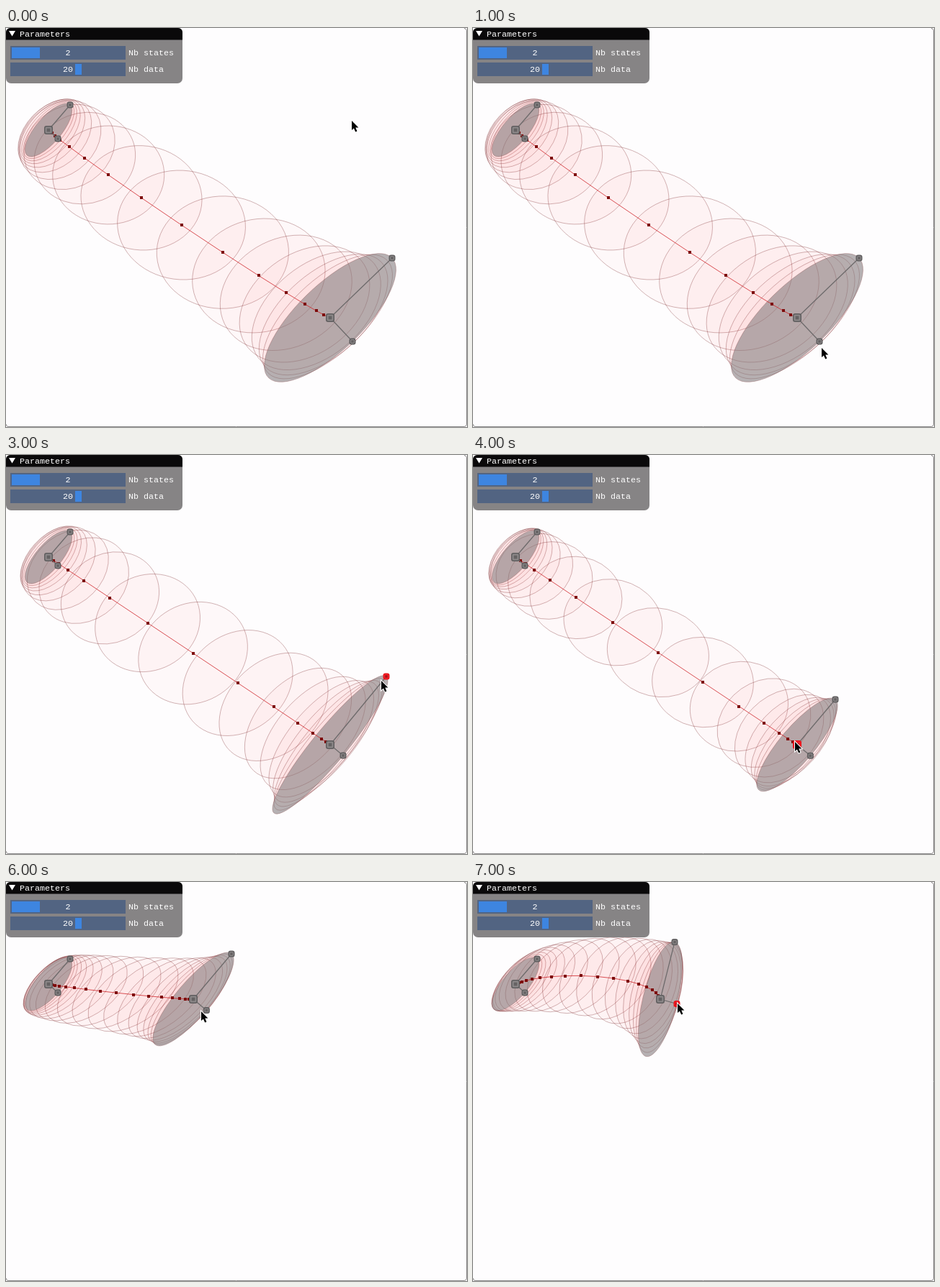
These frames come from a looping animation (640x555 px, 8000 ms). An HTML page with a canvas:

```html
<!DOCTYPE html>
<html lang="en">
<head>
<meta charset="utf-8">
<title>Gaussian interpolation</title>
<style>
  html, body { margin: 0; width: 100%; height: 100%; overflow: hidden; background: #fefdfe; }
  canvas { display: block; }
</style>
</head>
<body>
<canvas id="stage" width="640" height="555"></canvas>
<script>
const ctx = document.getElementById('stage').getContext('2d');
const STEP_MS = 1000;
const NB_DATA = 20;

// A Gaussian is a centre plus the vectors to its long and short axis handles.
// While a centre is dragged quickly, the tube trails its handles by `lag`.
const first = { center: [59, 142], long: [30, -35], short: [13, 12] };
const poses = [
  { center: [450, 403], long: [86, -83], short: [31, 33], cursor: [480, 129] },
  { center: [450, 403], long: [86, -83], short: [31, 33], cursor: [484, 445] },
  { center: [450, 403], long: [75, -94], short: [19, 15], cursor: [470, 419], active: 'short' },
  { center: [450, 403], long: [78, -95], short: [18, 15], cursor: [521, 314], active: 'long' },
  { center: [450, 403], long: [53, -63], short: [18.4, 15.3], cursor: [447, 399], active: 'center' },
  { center: [293.5, 165.5], long: [53, -63], short: [18.4, 15.3], lag: [5.2, 0.5], cursor: [283, 165], active: 'center' },
  { center: [260, 163], long: [53, -63], short: [18.4, 15.5], cursor: [271, 180] },
  { center: [260, 163], long: [20, -79.5], short: [23, 6.5], cursor: [284, 169], active: 'short' }
];

// Jacobi eigendecomposition of a symmetric 3x3 matrix; vectors are columns.
function eigen(matrix) {
  const a = matrix.map(row => row.slice());
  const v = [[1, 0, 0], [0, 1, 0], [0, 0, 1]];
  for (let sweep = 0; sweep < 12; sweep++) {
    for (const [p, q] of [[0, 1], [0, 2], [1, 2]]) {
      if (Math.abs(a[p][q]) < 1e-12) continue;
      const angle = 0.5 * Math.atan2(2 * a[p][q], a[q][q] - a[p][p]);
      const c = Math.cos(angle), s = Math.sin(angle);
      const rotateColumns = m => m.forEach(row => {
        [row[p], row[q]] = [c * row[p] - s * row[q], s * row[p] + c * row[q]];
      });
      rotateColumns(a);
      for (let k = 0; k < 3; k++) {
        [a[p][k], a[q][k]] = [c * a[p][k] - s * a[q][k], s * a[p][k] + c * a[q][k]];
      }
      rotateColumns(v);
    }
  }
  return { values: [0, 1, 2].map(i => Math.max(a[i][i], 1e-9)), vectors: v };
}

// Geodesic between two Gaussians embedded as augmented SPD matrices.
function interpolate(from, to) {
  const [ax, ay] = from.long, [bx, by] = from.short;
  const [lagX, lagY] = to.lag || [0, 0];
  const det = ax * by - ay * bx;
  const toLocal = ([x, y]) => [(by * x - bx * y) / det, (ax * y - ay * x) / det];
  const toStage = ([x, y]) => [ax * x + bx * y, ay * x + by * y];
  const offset = [to.center[0] + lagX - from.center[0], to.center[1] + lagY - from.center[1]];
  const columns = [[...toLocal(to.long), 0], [...toLocal(to.short), 0], [...toLocal(offset), 1]];
  const augmented = [0, 1, 2].map(i => [0, 1, 2].map(j =>
    columns.reduce((sum, col) => sum + col[i] * col[j], 0)));
  const { values, vectors } = eigen(augmented);

  return Array.from({ length: NB_DATA }, (_, n) => {
    const t = n / (NB_DATA - 1);
    const powers = values.map(value => value ** t);
    const entry = (i, j) => powers.reduce((sum, w, k) => sum + w * vectors[i][k] * vectors[j][k], 0);
    const beta = entry(2, 2);
    const mu = [entry(0, 2) / beta, entry(1, 2) / beta];
    const cov = (i, j) => entry(i, j) - beta * mu[i] * mu[j];
    const l11 = Math.sqrt(Math.max(cov(0, 0), 1e-9));
    const l21 = cov(0, 1) / l11;
    const l22 = Math.sqrt(Math.max(cov(1, 1) - l21 * l21, 1e-9));
    const shift = toStage(mu);
    return {
      center: [from.center[0] + shift[0], from.center[1] + shift[1]],
      long: toStage([l11, l21]),
      short: toStage([0, l22])
    };
  });
}

function ellipsePath({ center, long, short }) {
  ctx.save();
  ctx.transform(...long, ...short, ...center);
  ctx.beginPath();
  ctx.arc(0, 0, 1, 0, 2 * Math.PI);
  ctx.restore();
}

function box(x, y, w, h, fill, radius = 0) {
  ctx.fillStyle = fill;
  ctx.beginPath();
  ctx.roundRect(x, y, w, h, radius);
  ctx.fill();
}

function drawHandle([x, y], size, active) {
  const [ring, face, core] = active
    ? ['#e8121a', '#f8202a', '#a81418']
    : ['#5f5d5e', '#8b8788', '#656263'];
  const half = size / 2 - 0.75;
  box(x - half, y - half, 2 * half, 2 * half, face, 2.5);
  ctx.strokeStyle = ring;
  ctx.lineWidth = 1.5;
  ctx.stroke();
  const inner = size * 0.4;
  box(x - inner / 2, y - inner / 2, inner, inner, core);
}

function drawGaussian(gaussian, active) {
  const [x, y] = gaussian.center;
  const tips = ['long', 'short'].map(name => [name, [x + gaussian[name][0], y + gaussian[name][1]]]);
  ctx.strokeStyle = '#6c696a';
  ctx.lineWidth = 1.2;
  for (const [, tip] of tips) {
    ctx.beginPath();
    ctx.moveTo(x, y);
    ctx.lineTo(...tip);
    ctx.stroke();
  }
  drawHandle(gaussian.center, 12, active === 'center');
  for (const [name, tip] of tips) drawHandle(tip, 9, active === name);
}

function drawTube(chain) {
  for (const gaussian of chain) {
    ellipsePath(gaussian);
    ctx.fillStyle = 'rgba(220,45,40,.024)';
    ctx.fill();
    ctx.strokeStyle = 'rgba(115,30,32,.5)';
    ctx.lineWidth = 0.65;
    ctx.stroke();
  }
  for (const end of [chain[0], chain[NB_DATA - 1]]) {
    ellipsePath(end);
    ctx.fillStyle = 'rgba(124,120,122,.55)';
    ctx.fill();
  }
  ctx.beginPath();
  chain.forEach(({ center }) => ctx.lineTo(...center));
  ctx.strokeStyle = 'rgba(205,30,35,.85)';
  ctx.lineWidth = 0.9;
  ctx.stroke();
  for (const { center: [x, y] } of chain) {
    box(Math.round(x) - 2, Math.round(y) - 2, 4, 4, '#7d0c0c');
  }
}

function drawText(text, x, y, align = 'left') {
  ctx.font = '11.67px "Liberation Mono", monospace';
  ctx.textAlign = align;
  ctx.fillStyle = '#fff';
  ctx.fillText(text, x, y);
}

function drawSlider(y, label, value, grabX, grabWidth) {
  box(6, y, 160, 19, '#526482');
  box(grabX, y + 2, grabWidth, 15, '#3e85e0');
  drawText(value, 86, y + 13, 'center');
  drawText(label, 170, y + 13);
}

function drawPanel() {
  box(0, 0, 245, 77, '#868485', [6, 6, 7, 7]);
  box(0, 0, 245, 16.5, '#0a090a', [6, 6, 0, 0]);
  ctx.fillStyle = '#fff';
  ctx.beginPath();
  ctx.moveTo(4, 4);
  ctx.lineTo(13, 4);
  ctx.lineTo(8.5, 11.5);
  ctx.fill();
  drawText('Parameters', 19, 12);
  drawSlider(25, 'Nb states', '2', 8, 39);
  drawSlider(48, 'Nb data', '20', 96, 9);
}

function drawCursor([x, y]) {
  const outline = [[0, 0], [0, 13], [2.9, 10.4], [5.2, 15.4], [7.4, 14.4], [5.3, 9.5], [9.4, 9.5]];
  ctx.beginPath();
  outline.forEach(([dx, dy]) => ctx.lineTo(x + dx, y + dy));
  ctx.closePath();
  ctx.strokeStyle = '#fff';
  ctx.lineWidth = 2;
  ctx.stroke();
  ctx.fillStyle = '#000';
  ctx.fill();
}

function drawWindowEdge() {
  ctx.strokeStyle = '#8a8889';
  ctx.lineWidth = 1;
  ctx.beginPath();
  ctx.moveTo(636, 0.5);
  ctx.quadraticCurveTo(639.5, 0.5, 639.5, 4);
  ctx.lineTo(639.5, 551);
  ctx.quadraticCurveTo(639.5, 554.5, 636, 554.5);
  ctx.lineTo(3, 554.5);
  ctx.quadraticCurveTo(0.5, 554.5, 0, 551);
  ctx.stroke();
}

const chains = poses.map(pose => interpolate(first, pose));
const start = performance.now();

function render() {
  const index = Math.floor((performance.now() - start) / STEP_MS) % poses.length;
  const pose = poses[index];
  box(0, 0, 640, 555, '#fefdfe');
  drawTube(chains[index]);
  drawGaussian(first);
  drawGaussian(pose, pose.active);
  drawWindowEdge();
  drawPanel();
  drawCursor(pose.cursor);
  requestAnimationFrame(render);
}
render();
</script>
</body>
</html>
```
